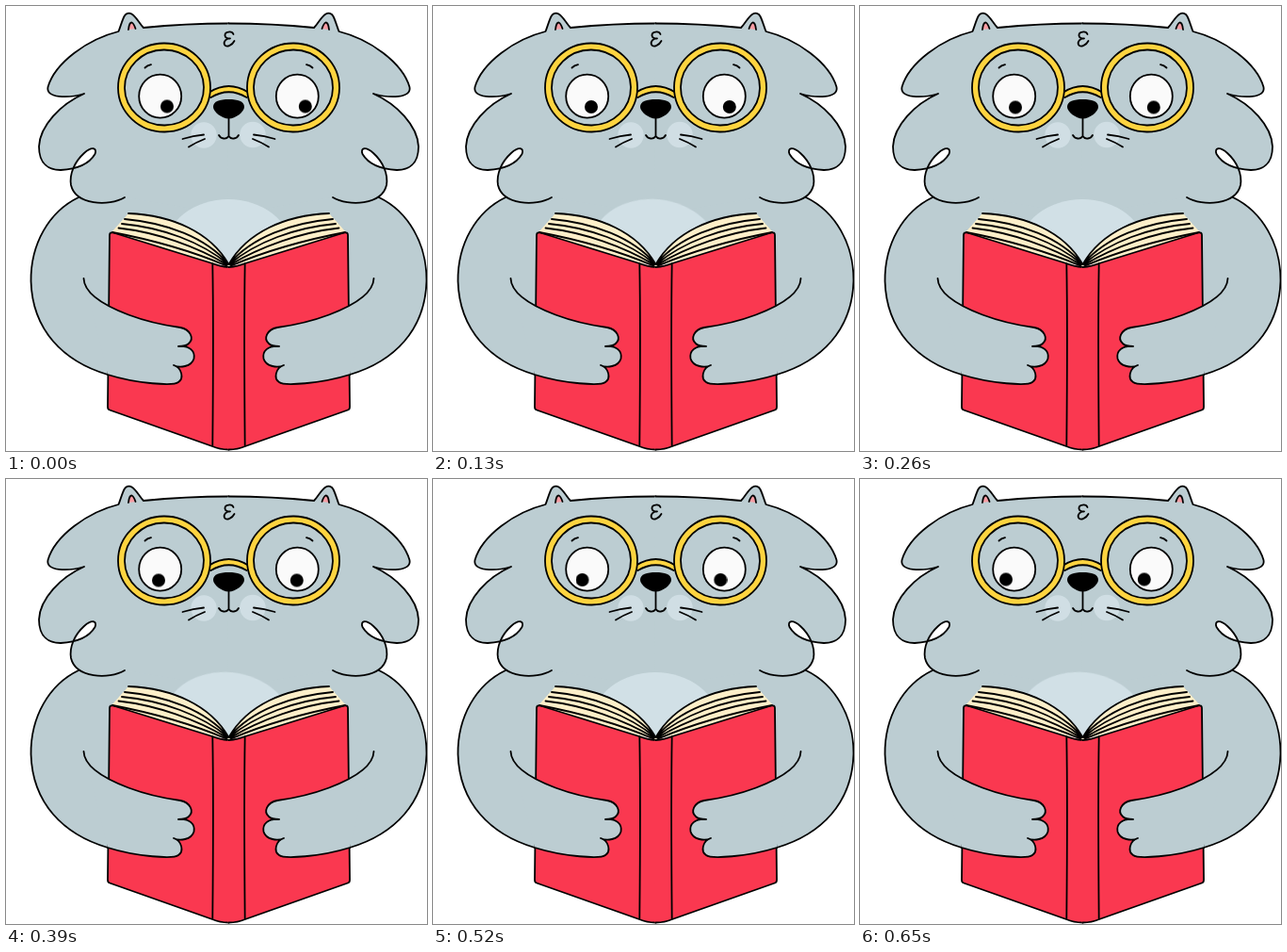
An HTML page for the animation above (780 ms loop, 447 by 472 pixels).

```html
<!DOCTYPE html>
<html lang="en">
<head>
<meta charset="utf-8">
<title>Reading cat</title>
<style>
  html, body { margin: 0; width: 100%; height: 100%; overflow: hidden; background: #fff; }
  svg { display: block; width: 100vw; height: 100vh; }
  .line { fill: none; stroke: #000; stroke-width: 1.8; stroke-linecap: round; stroke-linejoin: round; }
  .fur { fill: #bccdd2; }
  .soft { fill: #d1e0e6; }
  .red { fill: #fa3850; }
  .gold { fill: #fed440; }
  .page { fill: #fdefc9; }
  .pink { fill: #f79ca3; }
  .white { fill: #fafafa; }
</style>
</head>
<body>
<svg viewBox="0 0 447 472">
  <defs>
    <g id="body">
      <path class="fur" d="M77 203C46 218 26 252 26.5 292C28 344 61 377 108 391L238 391V150H110Z"/>
      <path class="line" d="M77 203C46 218 26 252 26.5 292C28 344 61 377 108 391"/>
    </g>
    <g id="head">
      <path class="fur" fill-rule="evenodd" d="M237.5 18.5C205 18.5 176 20 146 23C141 18 139 12 133.500 8.500C130.500 6.500 127 8 125.500 11C123 16 121.500 22 119.500 27C87 35 52 60 44.500 86C42 98 66 98 83 93C58 104 36 127 35 149C35 168 46 174 58 174C76 173 88 168 94.500 157C97 150 91 149 83 156C73 165 67 178 69 190C74 211 109 213 126 203L237.5 222Z"/>
      <path class="line" d="M236.500 18.500C205 18.500 176 20 146 23C141 18 139 12 133.500 8.500C130.500 6.500 127 8 125.500 11C123 16 121.500 22 119.500 27C87 35 52 60 44.500 86C42 98 66 98 83 93C58 104 36 127 35 149C35 168 46 174 58 174C76 173 88 168 94.500 157C97 150 91 149 83 156C73 165 67 178 69 190C74 211 109 213 126 203"/>
      <path class="pink" d="M130 25C130.500 20 132 17.500 133.500 17.500C135 18 136.500 21 137.500 24Z"/>
      <path class="line" d="M130 25C130.500 20 132 17.500 133.500 17.500C135 18 136.500 21 137.500 24"/>
    </g>
    <g id="lens">
      <path class="gold" fill-rule="evenodd" d="M119 87A49 47 0 1 1 217 86A49 47 0 1 1 119 87ZM126 87A42 40 0 1 0 210 86A42 40 0 1 0 126 87Z"/>
      <path class="line" d="M119 87A49 47 0 1 1 217 86A49 47 0 1 1 119 87ZM126 87A42 40 0 1 0 210 86A42 40 0 1 0 126 87Z"/>
      <path class="line" d="M147.500 65.500Q150 63 154 62.200"/>
      <ellipse class="white" cx="163.700" cy="95.700" rx="22.500" ry="23"/>
      <ellipse class="line" cx="163.700" cy="95.700" rx="22.500" ry="23"/>
    </g>
    <g id="cover">
      <path class="red" d="M110 243Q110 239.500 114 240.500L219 273L237.500 277V470.500Q227 470.500 219 467L110 428.500Q108 428 108 425Z"/>
      <path class="page" d="M130 220C177 222 217 240 236.500 274V276L219 272L112 240Z"/>
      <path class="line" d="M236.500 277Q227 276.500 219 273L114 240.500Q110 239.500 110 243L108 425Q108 428 110 428.500L219 467Q227 470.500 236.500 470.500M219.300 273Q220.500 340 219.300 467"/>
      <path class="line" d="M130 220C177 222 217 240 236.500 274M126 226C170 230 212 245 236.500 274M123 231C166 235 207 250 236 274M119.500 235.500C160 240 202 255 235 274.500M113 240C155 248 200 261 234 275.500"/>
    </g>
    <g id="arm">
      <path class="fur" d="M82.500 289C83 305 105 318 130 327.500C150 335 170 339 185 341C196 343 200 353 194 358C191 361 186 361 183 361C195 360 201 366 199.500 374C197 383 184 384 178 381C187 384 189 395 183 399C178 403 140 401 108 391Z"/>
      <path class="line" d="M82.500 289C83 305 105 318 130 327.500C150 335 170 339 185 341C196 343 200 353 194 358C191 361 186 361 183 361C195 360 201 366 199.500 374C197 383 184 384 178 381C187 384 189 395 183 399C178 403 140 401 108 391"/>
    </g>
  </defs>

  <g id="scene"></g>
</svg>
<script>
  const STEP = 130, COUNT = 6;
  const MIRROR = 'matrix(-1 0 0 1 473 0)';
  const both = id => `<use href="#${id}"/><use href="#${id}" transform="${MIRROR}"/>`;

  document.getElementById('scene').innerHTML = `
    ${both('body')}
    ${both('head')}
    <ellipse class="soft" id="bellyA" cx="236" cy="256" rx="66" ry="51"/>
    <ellipse class="soft" id="bellyB" cx="235.5" cy="256" rx="67" ry="51" transform="rotate(6 235.5 256)"/>
    <circle class="soft" cx="210" cy="137" r="13.7" opacity=".9"/>
    <circle class="soft" cx="262" cy="136.5" r="13.7" opacity=".9"/>
    <path class="line" d="M187.5 141Q199 137.5 210 136.5M194 149.5Q202 144.5 211 141M285.5 141Q274 137.5 263 136.5M279 149.5Q271 144.5 262 141"/>
    <path class="line" d="M236.5 119V138M226 137C228 141 234 142 236.5 138C239 142 245 141 247 137"/>
    <path class="line" d="M241.5 30C240 26 232 27 232.5 31.5C233 34 236 35 238 34.5C234 34 230.5 38 232 41C234 44.5 240 42 242.5 37"/>
    <path class="gold" d="M216 91.5Q236.5 78.5 257 91.5L256 97.5Q236.5 85.5 217 97.5Z"/>
    <path class="line" d="M216 91.5Q236.5 78.5 257 91.5M217.5 97Q236.5 85.5 255.5 97"/>
    ${both('lens')}
    <g id="eyes"><circle r="7"/><circle cx="146.8" r="7"/></g>
    <path d="M236.5 99C246 99 253 101 253 107C253 112 244 119.5 236.5 119.5S220 112 220 107C220 101 227 99 236.5 99Z"/>
    ${both('cover')}
    ${both('arm')}`;

  // Holds each value for one step, then jumps to the next.
  function play(id, prop, values) {
    const frames = values.map((v, i) => ({ [prop]: v, offset: i / COUNT, easing: 'step-end' }));
    frames.push({ [prop]: values[0], offset: 1 });
    document.getElementById(id).animate(frames, { duration: STEP * COUNT, iterations: Infinity });
  }

  const gaze = [[171, 106.5], [168, 107], [165, 107.5], [162, 107.5], [158.5, 107], [155, 106.5]];
  play('eyes', 'transform', gaze.map(([x, y]) => `translate(${x}px, ${y}px)`));
  play('bellyA', 'opacity', gaze.map((_, i) => 1 - i % 2));
  play('bellyB', 'opacity', gaze.map((_, i) => i % 2));
</script>
</body>
</html>
```
